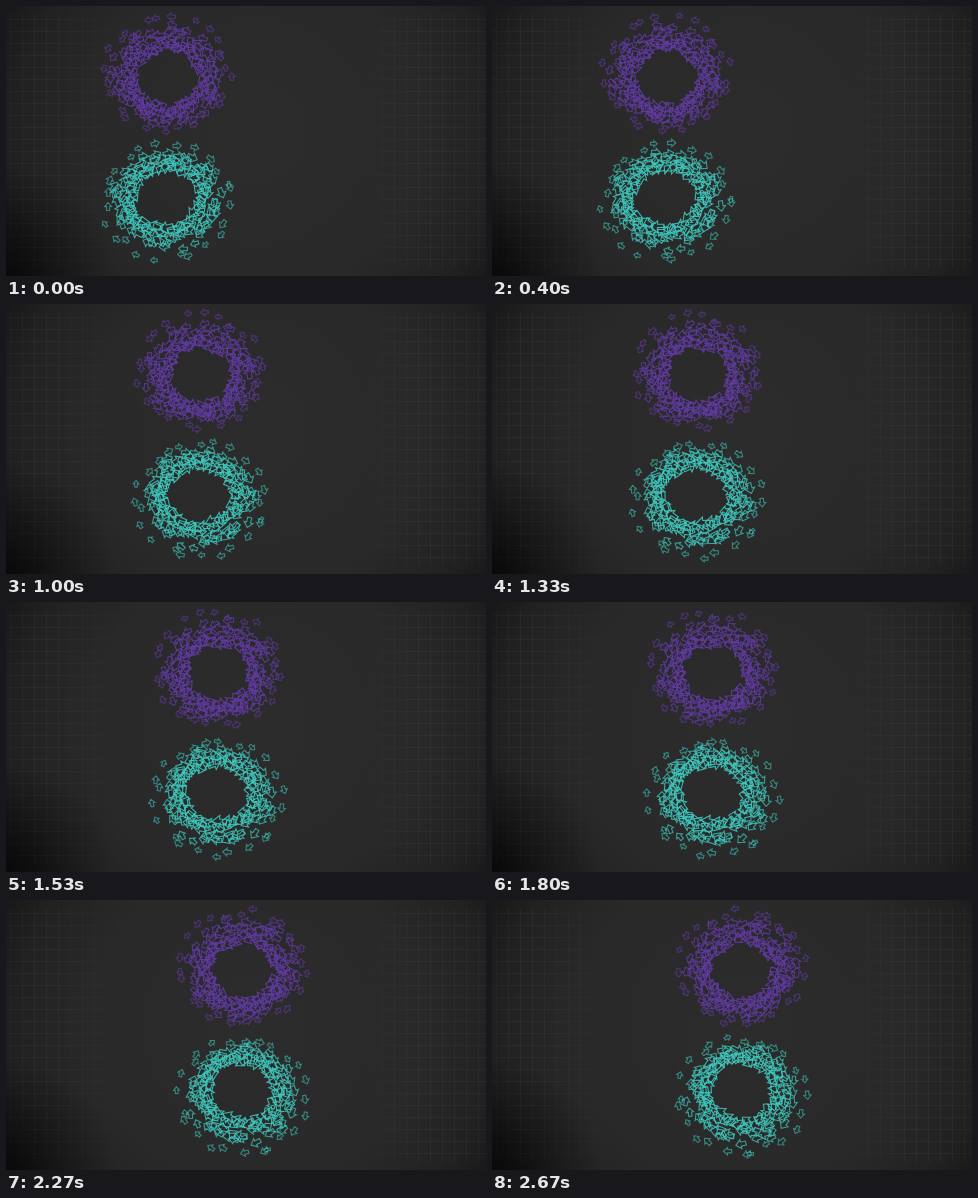
An HTML page with a canvas for the animation above (2.74 s loop, 480 by 270 pixels).

```html
<!DOCTYPE html>
<html lang="en">
<head>
<meta charset="utf-8">
<title>Arrow rings</title>
<style>
  html, body { margin: 0; width: 100%; height: 100%; overflow: hidden; background: #1b1b1b; }
  canvas { display: block; }
</style>
</head>
<body>
<canvas id="stage" width="480" height="270"></canvas>
<script>
const W = 480, H = 270, LOOP = 2740, STEP = 200 / 3, LAST_STEP = 40;
const ctx = document.getElementById('stage').getContext('2d');

function seeded(seed) {
  return () => {
    seed = (seed * 1664525 + 1013904223) >>> 0;
    return seed / 4294967296;
  };
}

// Each band: arrow count, inner and outer radius, arrow length, heading jitter, opacity
const bands = [
  { count: 24, from: 58, to: 67, size: 7.5, jitter: 0.25, alpha: 0.6 },
  { count: 26, from: 49, to: 57, size: 9.5, jitter: 0.4, alpha: 0.75 },
  { count: 40, from: 40, to: 50, size: 12, jitter: 0.7, alpha: 0.85 },
  { count: 46, from: 32, to: 40, size: 12.5, jitter: 0.9, alpha: 0.9 }
];

function makeRing(y, color, spin, seed) {
  const random = seeded(seed);
  const arrows = bands.flatMap(band => Array.from({ length: band.count }, (_, i) => ({
    angle: (i + random() * 0.9) / band.count * Math.PI * 2,
    radius: band.from + random() * (band.to - band.from),
    size: band.size * (0.85 + random() * 0.3),
    turn: (random() - 0.5) * 2 * band.jitter,
    alpha: band.alpha
  })));
  return { y, color, spin, arrows };
}

const rings = [
  makeRing(72, '#623ba4', -1, 17),
  makeRing(191, '#3ec6bb', 1, 92)
];

function glow(x, y, radius, stops) {
  const gradient = ctx.createRadialGradient(x, y, 0, x, y, radius);
  stops.forEach(([at, color]) => gradient.addColorStop(at, color));
  ctx.fillStyle = gradient;
  ctx.fillRect(0, 0, W, H);
}

function paintBackground() {
  glow(250, 125, 300, [[0, '#2d2c2c'], [0.55, '#2a2929'], [0.8, '#212121'], [1, '#131313']]);

  const fade = ctx.createLinearGradient(0, 0, W, 0);
  [[0, 0.02], [0.06, 0.04], [0.27, 0], [0.74, 0], [0.88, 0.04], [1, 0.03]]
    .forEach(([at, alpha]) => fade.addColorStop(at, `rgba(255,255,255,${alpha})`));
  ctx.strokeStyle = fade;
  ctx.lineWidth = 1;
  ctx.beginPath();
  for (let x = 4.5; x < W; x += 12) { ctx.moveTo(x, 8); ctx.lineTo(x, 262); }
  for (let y = 13.5; y < 262; y += 12) { ctx.moveTo(0, y); ctx.lineTo(W, y); }
  ctx.stroke();

  // Shadow in the lower left corner
  glow(0, H, 110, [[0, 'rgba(0,0,0,0.6)'], [1, 'rgba(0,0,0,0)']]);
}

function paintArrow(x, y, heading, size, alpha) {
  ctx.save();
  ctx.translate(x, y);
  ctx.rotate(heading);
  ctx.scale(size, size);
  ctx.beginPath();
  ctx.moveTo(0.5, 0);
  ctx.lineTo(0, 0.45);
  ctx.lineTo(0, 0.2);
  ctx.lineTo(-0.5, 0.2);
  ctx.lineTo(-0.5, -0.2);
  ctx.lineTo(0, -0.2);
  ctx.lineTo(0, -0.45);
  ctx.closePath();
  ctx.restore();
  ctx.globalAlpha = alpha;
  ctx.stroke();
}

function paintRing({ y, color, spin, arrows }, seconds) {
  const x = 160.5 + 33.5 * seconds;
  ctx.strokeStyle = color;
  ctx.lineWidth = 1.1;
  for (const { angle, radius, size, turn, alpha } of arrows) {
    const a = angle + spin * seconds * 0.65;
    const dx = Math.cos(a) * radius;
    // Rings are slightly flat; wider bands sit further from the other ring
    const dy = Math.sin(a) * radius * 0.9 + spin * (radius - 32) * 0.14;
    paintArrow(x + dx, y + dy, a + spin * Math.PI / 2 + turn, size, alpha);
  }
  ctx.globalAlpha = 1;
}

const stepStart = n => Math.round(n * STEP / 10) * 10;

function render(now) {
  const time = now % LOOP;
  let step = Math.min(LAST_STEP, Math.round(time / STEP));
  if (stepStart(step) > time) step--;
  paintBackground();
  rings.forEach(ring => paintRing(ring, step * STEP / 1000));
}

const begin = performance.now();
function tick() {
  render(performance.now() - begin);
  requestAnimationFrame(tick);
}
tick();
</script>
</body>
</html>
```
